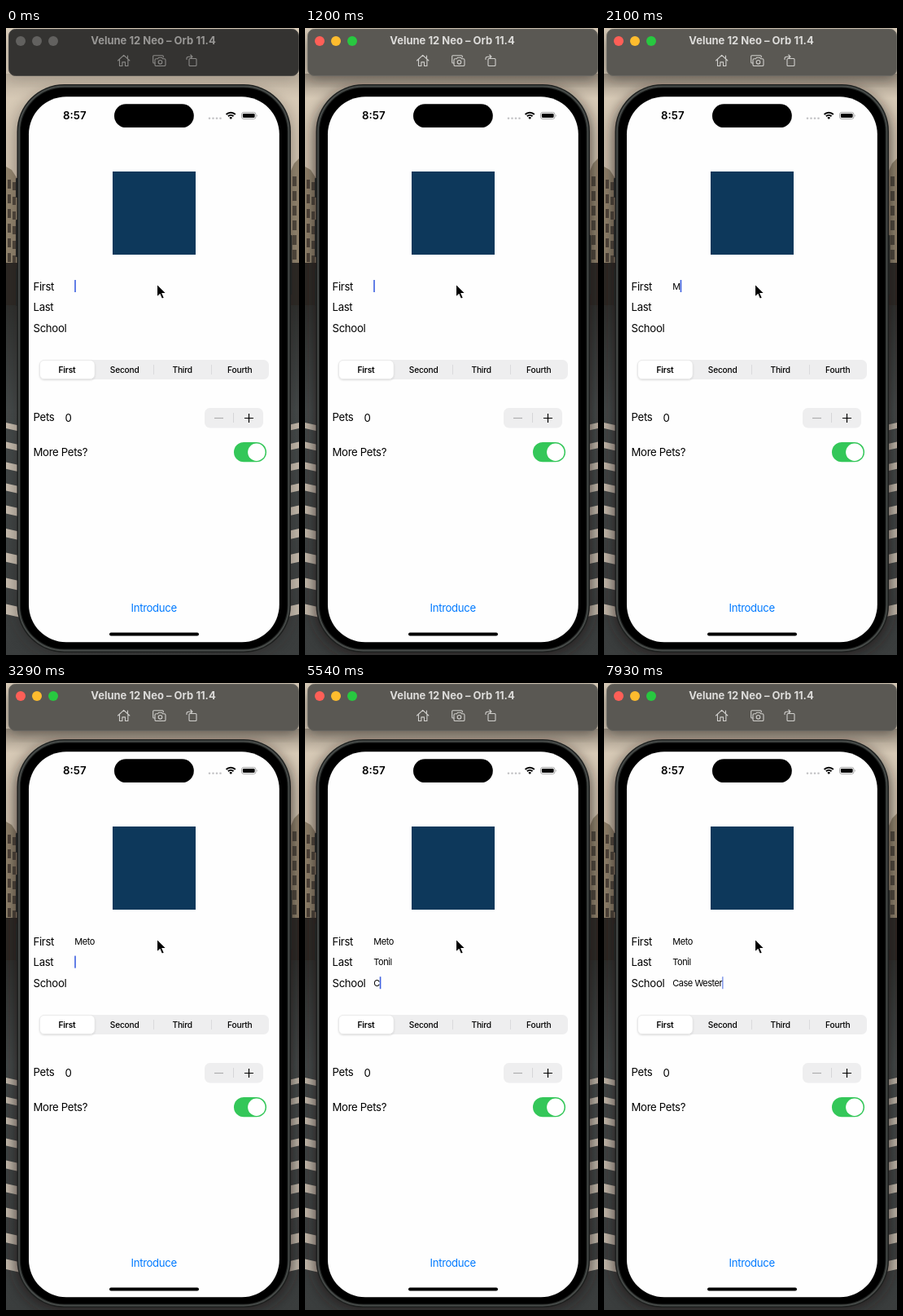
An HTML page that plays this animation: 360 px wide and 769 px high, repeating every 8 s.

```html
<!DOCTYPE html>
<html lang="en">
<head>
<meta charset="utf-8">
<title>Form demo</title>
<style>
  html, body { margin: 0; width: 100%; height: 100%; overflow: hidden; background: #d9cbb8; }
  svg { display: block; width: 360px; height: 769px; font-family: Inter, "Liberation Sans", sans-serif; letter-spacing: -.03em; }
  .label { font-size: 13.2px; letter-spacing: -.025em; }
  .field { font-size: 11px; }
  .seg { font-size: 10.2px; font-weight: 500; text-anchor: middle; letter-spacing: -.02em; }
  .mid { text-anchor: middle; }
  #win { --bar: #343331; --text: #989795; --icon: #8b8a88; --a: #62615f; --b: #62615f; --c: #62615f; --edge: #4d4b48; }
  #win.active { --bar: #5a5853; --text: #dddcda; --icon: #d0cfcc; --a: #fe5f57; --b: #febc2e; --c: #28c840; --edge: #6a6862; }
  #glow { opacity: .28; }
  .active #glow { opacity: .6; }
</style>
</head>
<body>
<svg viewBox="0 0 360 769">
  <defs>
    <linearGradient id="sky" x2="0" y2="1">
      <stop offset="0" stop-color="#dccfbc"/>
      <stop offset=".3" stop-color="#cdbfab"/>
    </linearGradient>
    <linearGradient id="road" x2="0" y2="1">
      <stop offset="0" stop-color="#2f302e"/>
      <stop offset=".3" stop-color="#454a4a"/>
      <stop offset="1" stop-color="#3a3d3d"/>
    </linearGradient>
    <linearGradient id="shade" x2="0" y2="1">
      <stop offset="0" stop-color="#1c1712" stop-opacity=".6"/>
      <stop offset="1" stop-color="#1c1712" stop-opacity="0"/>
    </linearGradient>
    <filter id="soft" x="-20%" y="-20%" width="140%" height="140%"><feGaussianBlur stdDeviation="8"/></filter>
    <filter id="lift" x="-10%" y="-30%" width="120%" height="170%">
      <feDropShadow dx="0" dy="1" stdDeviation="1" flood-opacity=".16"/>
    </filter>
  </defs>

  <g id="win">
    <!-- street behind the window -->
    <rect width="360" height="769" fill="url(#sky)"/>
    <path d="M0 170l7 4 9 14v124H0zM360 160l-6 6-8 18v128h14z" fill="#94866f"/>
    <g id="panes" fill="#51483d"></g>
    <rect y="288" width="360" height="56" fill="#2d2925"/>
    <rect y="340" width="360" height="429" fill="url(#road)"/>
    <g id="stripes" fill="#c6bcae"></g>
    <g id="glow">
      <rect x="4" y="8" width="354" height="54" rx="9" fill="#1c1712" filter="url(#soft)"/>
      <rect y="56" width="360" height="30" fill="url(#shade)"/>
      <rect x="10" y="74" width="343" height="696" rx="58" fill="#1c1712" filter="url(#soft)"/>
    </g>

    <!-- title bar -->
    <rect x="3.5" y="1.5" width="356" height="57" rx="8" fill="var(--bar)" stroke="var(--edge)"/>
    <circle cx="18" cy="16" r="6" fill="var(--a)"/>
    <circle cx="38" cy="16" r="6" fill="var(--b)"/>
    <circle cx="58" cy="16" r="6" fill="var(--c)"/>
    <text x="181" y="20.3" class="mid" font-size="13" font-weight="700" letter-spacing="0" fill="var(--text)">Velune 12 Neo – Orb 11.4</text>
    <g fill="none" stroke="var(--icon)" stroke-width="1.1" stroke-linejoin="round" stroke-linecap="round">
      <path d="M137.5 40l7.2-6.6 7.2 6.6M139.5 38.5v8h3.4v-4.6h3.6v4.6h3.4v-8M149.5 34v3"/>
      <path d="M183 43h-1.3q-1 0-1-1v-7.2q0-1 1-1h10.6q1 0 1 1v1"/>
      <path d="M184.5 37.7h2l1-1.4h4l1 1.4h2q1.500 0 1.500 1.500v6q0 1.300-1.500 1.300h-10q-1.500 0-1.500-1.300v-6q0-1.500 1.500-1.500z"/>
      <circle cx="189.500" cy="41.800" r="2.300"/>
      <rect x="225" y="37.500" width="9" height="9" rx="1"/>
      <path d="M222 38.500v-1q0-2.300 2.300-2.300h4.500M226.800 33l2.200 2.200-2.200 2.200"/>
    </g>
  </g>

  <!-- phone body -->
  <g fill="#222423">
    <rect x="12" y="184" width="4" height="24" rx="1"/>
    <rect x="12" y="235" width="4" height="46" rx="1"/>
    <rect x="12" y="295" width="4" height="46" rx="1"/>
    <rect x="348" y="254" width="3.500" height="73" rx="1"/>
  </g>
  <rect x="13.500" y="69" width="336.500" height="697" rx="58" fill="#1d1f1e"/>
  <rect x="16" y="71.500" width="331.500" height="692" rx="55.500" fill="none" stroke="#474b49" stroke-width="1.800"/>
  <rect x="18" y="73.500" width="327.500" height="688" rx="53.500"/>
  <rect x="28" y="84.300" width="307.800" height="669" rx="46" fill="#fefefe"/>

  <!-- status bar -->
  <text x="70" y="112" font-size="13.300" font-weight="600" letter-spacing="0">8:57</text>
  <rect x="133" y="93.300" width="97.800" height="28.800" rx="14.400"/>
  <g id="dots" fill="#c4c4c6"></g>
  <g fill="none" stroke="#000" stroke-width="2">
    <path d="M270.600 106a8 8 0 0 1 11.200 0M272.900 108.300a4.700 4.700 0 0 1 6.600 0"/>
  </g>
  <path d="M276.200 112l-1.900-2a2.700 2.700 0 0 1 3.800 0z"/>
  <rect x="289.500" y="103.500" width="17.500" height="8" rx="2.600" fill="none" stroke="#a5a5a5"/>
  <rect x="290.900" y="104.900" width="14.700" height="5.200" rx="1.400"/>
  <path d="M308.300 106q1.700 1.500 0 3z" fill="#a5a5a5"/>

  <rect x="131" y="176" width="102" height="102" fill="#0d385b"/>

  <!-- form -->
  <g class="label">
    <text x="33.500" y="321.700">First</text>
    <text x="33.500" y="347.300">Last</text>
    <text x="33.500" y="372.500">School</text>
    <text x="33.500" y="482.300">Pets</text>
    <text x="72.500" y="483">0</text>
    <text x="33.500" y="525.300">More Pets?</text>
    <text x="181.700" y="716.300" class="mid" fill="#007aff">Introduce</text>
  </g>
  <g class="field">
    <text class="entry" x="84.300" y="320.500"></text>
    <text class="entry" x="84.300" y="346.200"></text>
    <text class="entry" x="84.300" y="371.800"></text>
  </g>
  <rect id="caret" width="1.600" height="15" fill="#3c5fe0"/>

  <rect x="41" y="407" width="282" height="24" rx="6.500" fill="#eeeeef"/>
  <path d="M181.500 413v12M252.500 413v12" stroke="#dadadc"/>
  <rect x="41.500" y="407.500" width="67.500" height="23" rx="5.500" fill="#fff" stroke="#e0e0e1" stroke-width=".5" filter="url(#lift)"/>
  <g class="seg">
    <text x="75" y="422.700" font-weight="600">First</text>
    <text x="145.700" y="422.700">Second</text>
    <text x="216.700" y="422.700">Third</text>
    <text x="287.300" y="422.700">Fourth</text>
  </g>

  <rect x="244" y="466" width="72" height="24.500" rx="6.500" fill="#eeeeef"/>
  <path d="M279.500 472v12" stroke="#d6d6d8"/>
  <path d="M256 478.500h11" stroke="#adadae" stroke-width="1.200"/>
  <path d="M293 478.500h11M298.500 473v11" stroke="#000" stroke-width="1.200"/>

  <rect x="280" y="508" width="40" height="24.300" rx="12.150" fill="#34c759"/>
  <circle cx="307.800" cy="520.200" r="10.700" fill="#fff"/>
  <rect x="127" y="741.500" width="110" height="4" rx="2"/>

  <path d="M185.500 314.200v15.800l3.600-3.300 2.400 5.500 2.900-1.200-2.400-5.400h5z" stroke="#fff" stroke-width="1.100"/>
</svg>
<script>
  const LOOP = 8000, ACTIVE_AT = 1200;
  const ENTRY = ["Meto", "Tonil", "Case Wester"];

  // [ms, focused row, letters typed in that row, caret opacity]
  const STEPS = [
    [0, 0, 0, 1], [600, 0, 0, .2], [900, 0, 0, .6], [1050, 0, 0, 1],
    [1650, 0, 0, .5], [1800, 0, 0, 0], [1950, 0, 1, 1],
    [2550, 0, 2, 1], [2690, 0, 4, 1],
    [3290, 1, 0, 1], [3890, 1, 0, .5], [4040, 1, 0, 0], [4190, 1, 1, 1],
    [4490, 1, 3, 1], [4640, 1, 5, 1],
    [5090, 2, 0, 1], [5540, 2, 1, 1], [5690, 2, 2, 1],
    [5990, 2, 3, 1], [6140, 2, 4, 1], [6440, 2, 5, 1],
    [6740, 2, 6, 1], [6890, 2, 7, 1],
    [7190, 2, 8, 1], [7340, 2, 10, 1], [7480, 2, 11, 1], [7930, 2, 11, .6]
  ];

  const $ = id => document.getElementById(id);
  const win = $("win"), caret = $("caret");
  const entries = [...document.querySelectorAll(".entry")];

  function add(parent, tag, attrs) {
    const el = document.createElementNS("http://www.w3.org/2000/svg", tag);
    for (const k in attrs) el.setAttribute(k, attrs[k]);
    parent.append(el);
  }

  for (let i = 0; i < 4; i++) add($("dots"), "circle", { cx: 250 + i * 4.5, cy: 110.7, r: 1.3 });
  for (let y = 186; y < 290; y += 18) {
    add($("panes"), "rect", { x: 2, y, width: 4, height: 11 });
    add($("panes"), "rect", { x: 8, y: y + 3, width: 4, height: 10 });
    add($("panes"), "rect", { x: 352, y: y - 4, width: 5, height: 12 });
  }
  for (let i = 0; i < 9; i++) {
    const y = 484 + i * 23 + i * i * .6, h = 7 + i * .7;
    add($("stripes"), "path", { d: `M0 ${y}l18 4v${h}l-18-4zM360 ${y}l-18 4v${h}l18-4z` });
  }

  let shown = null;
  function render(t) {
    win.classList.toggle("active", t >= ACTIVE_AT);
    const step = STEPS.findLast(s => s[0] <= t);
    if (step === shown) return;
    shown = step;
    const [, row, count, alpha] = step;
    entries.forEach((el, i) => {
      const n = i < row ? ENTRY[i].length : i === row ? count : 0;
      el.textContent = ENTRY[i].slice(0, n).replace(/ /g, "\u00a0");
    });
    const width = count ? entries[row].getComputedTextLength() : 0;
    caret.setAttribute("x", 84.2 + width);
    caret.setAttribute("y", 309 + row * 25.6);
    caret.setAttribute("opacity", alpha);
  }

  const start = performance.now();
  function tick() {
    render((performance.now() - start) % LOOP);
    requestAnimationFrame(tick);
  }
  tick();
</script>
</body>
</html>
```
